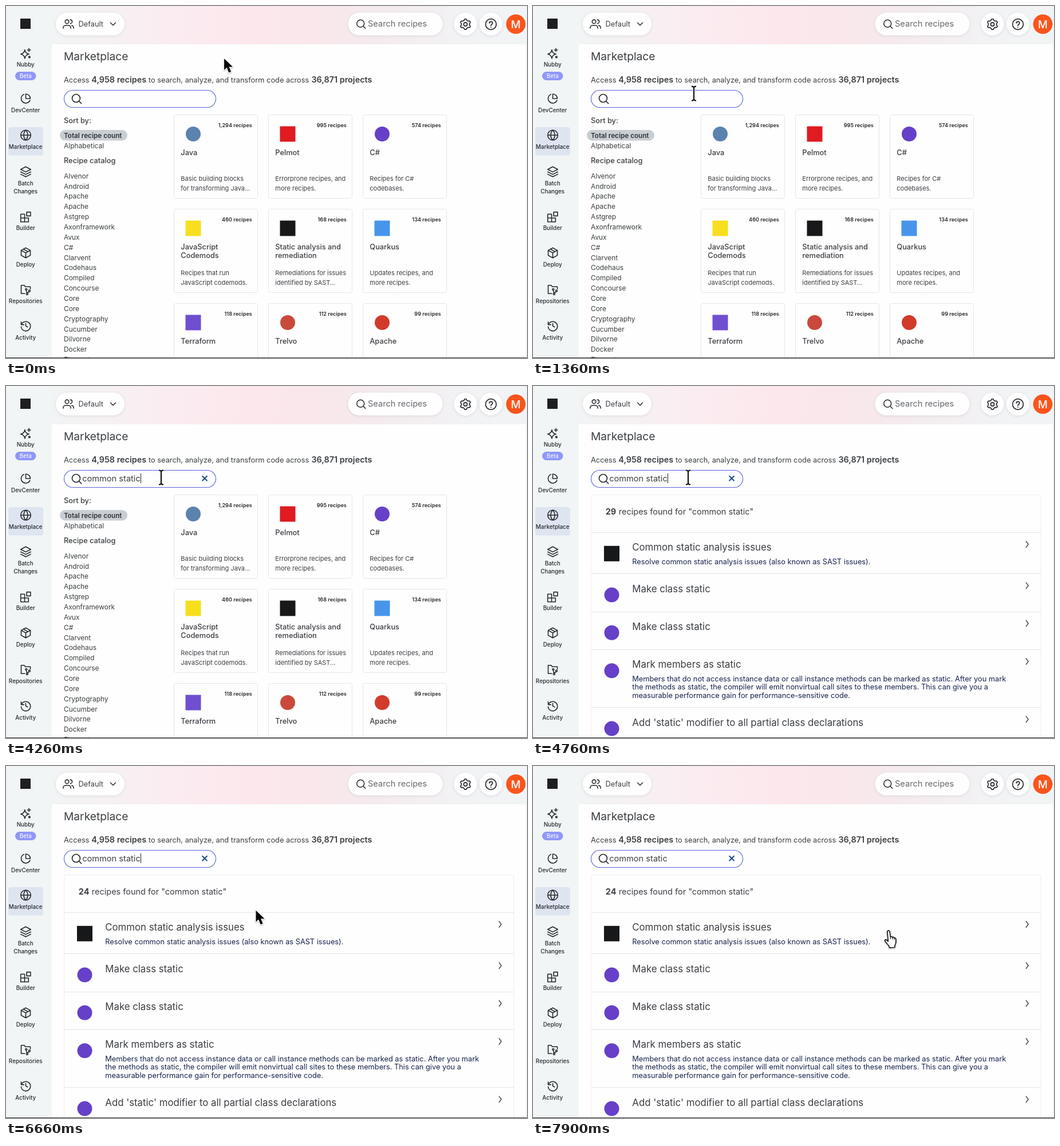
Write an HTML page with a canvas that moves like this. It is 910 px wide and 616 px high and loops after 8 s.

```html
<!DOCTYPE html>
<html lang="en">
<head>
<meta charset="utf-8">
<title>Marketplace search</title>
<style>
html, body { margin: 0; width: 100%; height: 100%; overflow: hidden; background: #f1f4f5; }
canvas { display: block; width: 910px; height: 616px; }
</style>
</head>
<body>
<canvas id="stage"></canvas>
<script>
const W = 910, H = 616, LOOP = 8000;
const canvas = document.getElementById('stage');
const dpr = window.devicePixelRatio || 1;
canvas.width = W * dpr;
canvas.height = H * dpr;
const ctx = canvas.getContext('2d');

const INK = '#26292d', TEXT = '#3b3e43', NAVY = '#17224d';
const LINE = '#e5e6e9', PAGE = '#fdfefd', PURPLE = '#6640c8';

// --- drawing helpers ---
function text(str, x, y, size, weight = 400, color = TEXT, align = 'left') {
  ctx.font = `${weight} ${size}px Inter, sans-serif`;
  ctx.fillStyle = color;
  ctx.textAlign = align;
  ctx.fillText(str, x, y);
}

function box(x, y, w, h, r, fill, stroke, width = 1) {
  ctx.beginPath();
  ctx.roundRect(x, y, w, h, r);
  if (fill) { ctx.fillStyle = fill; ctx.fill(); }
  if (stroke) { ctx.strokeStyle = stroke; ctx.lineWidth = width; ctx.stroke(); }
}

function disc(x, y, r, fill) {
  box(x - r, y - r, 2 * r, 2 * r, r, fill);
}

function raised(x, y, w, h) {
  ctx.save();
  ctx.shadowColor = 'rgba(60,70,90,.14)';
  ctx.shadowBlur = 5 * dpr;
  ctx.shadowOffsetY = dpr;
  box(x, y, w, h, h / 2, '#fefefe');
  ctx.restore();
}

function rule(x1, y, x2, color = LINE) {
  ctx.fillStyle = color;
  ctx.fillRect(x1, y, x2 - x1, 1);
}

// Icons live in a 24 unit square centred on (x, y).
function icon(path, x, y, scale = 0.8, width = 1.9, color = INK) {
  ctx.save();
  ctx.translate(x - 12 * scale, y - 12 * scale);
  ctx.scale(scale, scale);
  ctx.lineWidth = width;
  ctx.lineCap = ctx.lineJoin = 'round';
  ctx.strokeStyle = color;
  ctx.stroke(new Path2D(path));
  ctx.restore();
}

const ring = (x, y, r) =>
  `M${x + r} ${y}a${r} ${r} 0 1 1 ${-2 * r} 0a${r} ${r} 0 1 1 ${2 * r} 0`;

// Six rounded teeth around a hub.
function gear() {
  let d = '';
  for (let i = 0; i < 24; i++) {
    const a = (i - 0.5) * Math.PI / 12 + Math.PI / 6;
    const r = i % 4 < 2 ? 11 : 8.4;
    d += `${i ? 'L' : 'M'}${12 + r * Math.cos(a)} ${12 + r * Math.sin(a)}`;
  }
  return d + 'Z' + ring(12, 12, 3.6);
}

const ICON = {
  users: ring(9, 7, 4) + 'M1 21v-1a5 5 0 0 1 5-5h6a5 5 0 0 1 5 5v1M16 3a4 4 0 0 1 0 8M19 15a5 5 0 0 1 4 5v1',
  search: ring(11, 11, 8.5) + 'M17.3 17.3l5 5',
  gear: gear(),
  help: ring(12, 12, 11) + 'M8.8 9.5a3.2 3.2 0 0 1 6.4.5c0 2.2-3.2 2.4-3.2 4.5M12 18v.1',
  sparkle: 'M10 4Q11 12 19 13.5Q11 15 10 23Q9 15 1 13.5Q9 12 10 4ZM19 1v7M15.5 4.5h7' + ring(20, 20, 1.6),
  pie: 'M21.2 15.9A10 10 0 1 1 8 2.8M22 12A10 10 0 0 0 12 2v10z',
  globe: ring(12, 12, 11) + 'M1 12h22M12 1a16 16 0 0 1 0 22a16 16 0 0 1 0-22',
  layers: 'M12 1L1 7l11 5.5L23 7zM1 12.3l11 5.5 11-5.5M1 17.5L12 23l11-5.5',
  blocks: 'M1 6h8.5v8.5H1zM1 14.5h8.5V23H1zM9.5 14.5H18V23H9.5zM14 1.5h8.5V10H14z',
  cube: 'M12 1l10 5.5v11L12 23 2 17.5v-11zM2 6.5L12 12l10-5.5M12 12v11M7 3.8l10 5.5',
  folder: 'M22 11V6H11L8.5 3H2v18h8' + ring(13, 12, 1.8) + ring(20, 15, 1.8) + ring(15, 22, 1.8) + 'M13 14l1.6 6M20 17q-1 2-5 2',
  history: 'M2 3v6h6M2.5 9a10.2 10.2 0 1 1-.6 4.5M12 6.5V12l4 2.2',
  down: 'M6 9l6 6 6-6',
  right: 'M9 4l6 8-6 8',
  cross: 'M4 4l16 16M20 4L4 20'
};

// --- page parts ---
const NAV = [
  ['sparkle', 83, 106, 'Nubby'],
  ['pie', 162, 186, 'DevCenter'],
  ['globe', 226, 250, 'Marketplace'],
  ['layers', 290, 314, 'Batch', 'Changes'],
  ['blocks', 369, 392, 'Builder'],
  ['cube', 432, 456, 'Deploy'],
  ['folder', 496, 520, 'Repositories'],
  ['history', 560, 584, 'Activity']
];

function frame() {
  ctx.fillStyle = '#f1f5f5';
  ctx.fillRect(0, 0, W, H);
  const g = ctx.createLinearGradient(0, 0, W, 0);
  [[0, '#f1f5f5'], [.12, '#f3f3f4'], [.3, '#faedf1'], [.47, '#fce7ec'],
   [.62, '#f8e7eb'], [.74, '#f4ecef'], [.9, '#f2f3f5'], [1, '#f1f4f5']]
    .forEach(([p, c]) => g.addColorStop(p, c));
  ctx.fillStyle = g;
  ctx.fillRect(80, 0, W - 80, 67);
  ctx.fillStyle = PAGE;
  ctx.fillRect(80, 67, 828, H);

  raised(87, 11.5, 120, 40);
  icon(ICON.users, 109, 31.5, 0.82);
  text('Default', 126.5, 36, 12.8);
  icon(ICON.down, 187, 31.5, 0.75, 1.9);
  raised(597.5, 11.5, 165, 40);
  icon(ICON.search, 620, 31.5, 0.76, 2);
  text('Search recipes', 632, 36.3, 14.6, 400, '#66696e');
  raised(782.5, 11.5, 40, 40);
  icon(ICON.gear, 802.5, 32, 0.85, 2);
  raised(827, 11.5, 40, 40);
  icon(ICON.help, 847, 32, 0.85, 2);
  disc(890.5, 31.7, 17, '#fa541c');
  text('M', 890.5, 38.5, 18.5, 500, '#fff', 'center');

  box(25, 22, 18, 18, 0, '#1d1f22');
  box(4, 212, 61, 49.5, 4, '#dee5f1');
  for (const [name, iy, ty, ...labels] of NAV) {
    icon(ICON[name], 34.5, iy, 0.8, 2);
    labels.forEach((s, i) => text(s, 34.2, ty + i * 14, 9.9, 500, INK, 'center'));
  }
  box(16, 115, 36.5, 15, 7.5, '#9097f8');
  text('Beta', 34.2, 126, 9.9, 400, '#fff', 'center');

  text('Marketplace', 101, 94.8, 19.2);
  text('Access', 101, 133.5, 12.8);
  text('4,958 recipes', 149.3, 133.5, 14.4, 600);
  text('to search, analyze, and transform code across', 249, 133.5, 12.8);
  text('36,871 projects', 533.4, 133.5, 14.4, 600);
}

const CATALOG = ['Alvenor', 'Android', 'Apache', 'Apache', 'Astgrep', 'Axonframework',
  'Avux', 'C#', 'Clarvent', 'Codehaus', 'Compiled', 'Concourse', 'Core', 'Core',
  'Cryptography', 'Cucumber', 'Dilvorne', 'Docker', 'Elements'];

// count, title lines, description lines, mark shape, mark colour
const CARDS = [
  ['1,294', 'Java', 'Basic building blocks|for transforming Java...', 'disc', '#5c82b0'],
  ['995', 'Pelmot', 'Errorprone recipes, and|more recipes.', 'square', '#e01b22'],
  ['574', 'C#', 'Recipes for C#|codebases.', 'disc', PURPLE],
  ['460', 'JavaScript|Codemods', 'Recipes that run|JavaScript codemods.', 'square', '#f7df1e'],
  ['168', 'Static analysis and|remediation', 'Remediations for issues|identified by SAST...', 'square', '#17181a'],
  ['134', 'Quarkus', 'Updates recipes, and|more recipes.', 'square', '#4695eb'],
  ['118', 'Terraform', '', 'square', '#6f4fd0'],
  ['112', 'Trelvo', '', 'disc', '#c94a3b'],
  ['99', 'Apache', '', 'disc', '#d23b2c']
];

function mark(shape, x, y, color) {
  if (shape === 'disc') disc(x, y, 13, color);
  else box(x - 13.5, y - 13.5, 27, 27, 0, color);
}

function browse() {
  text('Sort by:', 101, 204.8, 12.8, 500);
  box(94, 217, 118, 18.5, 9, '#c9ced3');
  text('Total recipe count', 101, 230.5, 11.7, 600, '#303338');
  text('Alphabetical', 101, 249, 12);
  text('Recipe catalog', 101, 275.2, 12.8, 500);
  CATALOG.forEach((s, i) => text(s, 101, 301.7 + i * 17.86, 11.9));

  CARDS.forEach(([count, title, note, shape, color], i) => {
    const x = 293.5 + i % 3 * 165, y = 190.5 + Math.floor(i / 3) * 165;
    box(x, y, 146, 146, 3, '#fefefe', LINE);
    mark(shape, x + 33.5, y + 33.5, color);
    text(count + ' recipes', x + 136.3, y + 21, 9.1, 600, INK, 'right');
    title.split('|').forEach((s, k) => text(s, x + 11.8, y + 70.6 + k * 14.4, 12.8, 500));
    note.split('|').forEach((s, k) => text(s, x + 11.8, y + 115 + k * 17, 11));
  });
}

// row top, title, description lines
const ROWS = [
  [256, 'Common static analysis issues', ['Resolve common static analysis issues (also known as SAST issues).']],
  [328.3, 'Make class static', []],
  [394.5, 'Make class static', []],
  [461, 'Mark members as static', [
    'Members that do not access instance data or call instance methods can be marked as static. After you mark',
    'the methods as static, the compiler will emit nonvirtual call sites to these members. This can give you a',
    'measurable performance gain for performance-sensitive code.']],
  [562.3, "Add 'static' modifier to all partial class declarations", []]
];

function results(count) {
  box(101.5, 190.5, 785.5, 440, 3, '#fefefe', '#ededf0');
  text(count, 126.8, 224.5, 14.4, 700);
  text('recipes found for "common static"', 149.8, 224.5, 14.5);
  ROWS.forEach(([y, title, note], i) => {
    rule(101, Math.round(y), 887);
    mark(i ? 'disc' : 'square', 137.5, y + 37.3, i ? PURPLE : '#17181a');
    text(title, 173.3, y + 32.3, 16.8);
    note.forEach((s, k) => text(s, 173.3, y + 55.7 + k * 14.7, 12.8, 400, NAVY));
    icon(ICON.right, 863.2, y + 21, 0.65, 2.2, '#44474c');
  });
}

// --- timing ---
const KEYS = [2900, 3060, 3160, 3330, 3460, 3600, 3665, 3730, 3900, 3990, 4080, 4170, 4260];
const BLINKS = [430, 930, 1430, 1930, 2400, 4800, 5260, 5760, 6260, 6760, 7260, 7760];
const passed = (times, t) => times.filter(v => v <= t).length;

function field(t) {
  box(101.5, 147.5, 265, 30, 15, '#fefefe', '#5a62de', 1.1);
  icon(ICON.search, 123.3, 162.3, 0.82, 2);
  const typed = 'common static'.slice(0, passed(KEYS, t));
  text(typed, 133.2, 166.8, 14.6);
  const end = 133.2 + ctx.measureText(typed).width;
  if (passed(BLINKS, t) % 2) {
    ctx.fillStyle = '#222';
    ctx.fillRect(Math.round(end), 153, 1, 17);
  }
  if (typed) icon(ICON.cross, 347, 161.7, 0.48, 4.4, '#1f4b92');
}

// time, x, y of the pointer
const PATH = [
  [0, 381, 92], [30, 380.5, 92], [630, 380.5, 92], [850, 362, 103], [1100, 310, 132],
  [1360, 281, 153], [1600, 274, 162], [1930, 271, 160], [6260, 271, 160],
  [6450, 335, 196], [6660, 436, 252.5], [6880, 540, 283], [7150, 598, 291],
  [7500, 619, 290], [7900, 621, 288], [8000, 621, 288]
];

const slope = (i, a) => (PATH[i + 1][a] - PATH[i][a]) / (PATH[i + 1][0] - PATH[i][0]);

function tangent(i, a) {
  if (i === 0 || i === PATH.length - 1) return 0;
  const p = slope(i - 1, a), q = slope(i, a);
  return p * q <= 0 ? 0 : 2 * p * q / (p + q);
}

// Monotone cubic through the pointer's stops.
function pointerAt(t) {
  let i = 0;
  while (i < PATH.length - 2 && PATH[i + 1][0] <= t) i++;
  const h = PATH[i + 1][0] - PATH[i][0], u = (t - PATH[i][0]) / h, v = 1 - u;
  return [1, 2].map(a =>
    PATH[i][a] * (1 + 2 * u) * v * v + PATH[i + 1][a] * u * u * (3 - 2 * u) +
    h * u * v * (tangent(i, a) * v - tangent(i + 1, a) * u));
}

const ARROW = new Path2D('M0 0V20L4.6 15.8 8.2 24.6 12.2 23 8.6 14.6H15Z');
const BEAM = new Path2D('M-4-12.5Q0-12.5 0-9.5V9.5Q0 12.5-4 12.5M4-12.5Q0-12.5 0-9.5M0 9.5Q0 12.5 4 12.5');
const HAND = new Path2D('M5.9 4.4Q6.2 1.6 8.4 2Q9.9 2.4 10.2 4.6L11.3 12.8Q13.7 11.8 14.8 13.8Q17 12.8 18 15Q20.3 14.5 20.9 17L21 22Q20.7 25 19.2 27.6L18.8 31.5 9.6 31.8Q8.6 28 5.4 25L1.8 20.4Q.8 17.5 4 18L7.3 20.8Z');

function pointer(t) {
  const [x, y] = pointerAt(t);
  const inField = x > 101 && x < 367 && y > 148 && y < 178;
  ctx.save();
  ctx.translate(x, y);
  ctx.lineJoin = 'round';
  const outline = (path, width, color) => {
    ctx.lineWidth = width;
    ctx.strokeStyle = color;
    ctx.stroke(path);
  };
  if (inField) {
    outline(BEAM, 4, '#fff');
    outline(BEAM, 2.2, '#111');
  } else {
    const hand = t > 4760 && y > 256.5;
    if (hand) ctx.translate(-8, -2);
    const path = hand ? HAND : ARROW;
    ctx.shadowColor = 'rgba(0,0,0,.3)';
    ctx.shadowBlur = 2 * dpr;
    ctx.shadowOffsetY = dpr;
    outline(path, hand ? 3 : 2.6, '#fff');
    ctx.shadowColor = 'transparent';
    ctx.fillStyle = hand ? '#fff' : '#080808';
    ctx.fill(path);
    if (hand) {
      outline(path, 1.7, '#111');
      outline(new Path2D('M11.3 13v4M14.9 14v3.5M18.1 15.2v3'), 1.1, '#111');
    }
  }
  ctx.restore();
}

function draw(t) {
  ctx.setTransform(dpr, 0, 0, dpr, 0, 0);
  frame();
  field(t);
  if (t < 4760) browse();
  else results(t < 4800 ? '29' : '24');
  pointer(t);
  rule(0, 615, W, '#3a3c3e');
}

const start = performance.now();
function tick() {
  draw((performance.now() - start) % LOOP);
  requestAnimationFrame(tick);
}
tick();
</script>
</body>
</html>
```
